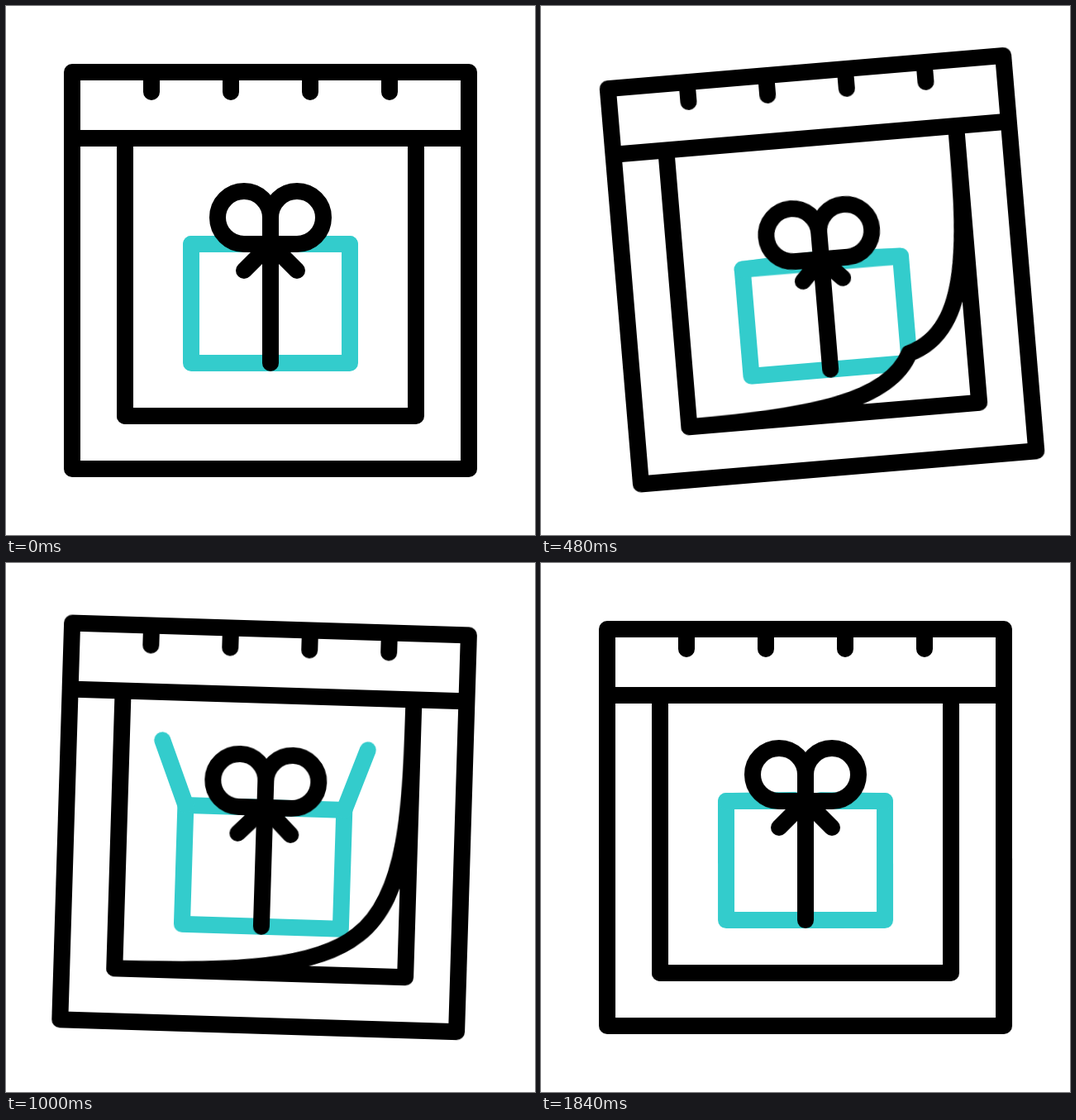
Animation of 640 by 640 pixels, one loop 2000 ms. Source, as an HTML page:

```html
<!DOCTYPE html>
<html lang="en">
<head>
<meta charset="utf-8">
<title>Gift calendar</title>
<style>
  html, body { margin: 0; width: 100%; height: 100%; overflow: hidden; background: #fff; }
  svg { display: block; width: 100vw; height: 100vh; }
  path { fill: none; stroke: #000; stroke-width: 20; stroke-linecap: round; stroke-linejoin: round; }
  .teal path { stroke: #3cc; }

  .swing, .box, .lid, .flap, .bow, .loop, .tails, .stem, .curl {
    animation: 2s cubic-bezier(.3333, 0, .6667, 1) infinite;
  }

  /* The whole calendar swings from its top edge */
  .swing { transform-origin: 320px 80px; animation-name: swing; }
  @keyframes swing {
    0%, 93.55%, 100% { transform: rotate(0deg); }
    22.15% { transform: rotate(-5deg); }
    42.15% { transform: rotate(3deg); }
    63.55% { transform: rotate(-1deg); }
  }

  /* The gift hops, lands squashed, then settles */
  .box { animation-name: box; }
  @keyframes box {
    0%, 93.55%, 100% { d: path("M224 288L416 288L416 432L224 432Z"); }
    11% { d: path("M224 264L416 264L416 412L224 412Z"); }
    22.15% { d: path("M224 312L416 312L416 441L224 441Z"); }
    42.15%, 63.55% { d: path("M224 296L416 296L416 440L224 440Z"); }
  }

  .lid { animation-name: lid; }
  @keyframes lid {
    0%, 93.55%, 100% { transform: translateY(0px); }
    11% { transform: translateY(-24px); }
    22.15% { transform: translateY(24px); }
    42.15%, 63.55% { transform: translateY(8px); }
  }

  .left { transform-origin: 224px 288px; animation-name: left; }
  @keyframes left {
    0%, 22.15%, 93.55%, 100% { transform: rotate(90deg); }
    42.15% { transform: rotate(-24deg); }
    63.55% { transform: rotate(-15.7deg); }
  }

  .right { transform-origin: 416px 288px; animation-name: right; }
  @keyframes right {
    0%, 22.15%, 93.55%, 100% { transform: rotate(-90deg); }
    42.15% { transform: rotate(22deg); }
    63.55% { transform: rotate(14.5deg); }
  }

  .bow { animation-name: bow; }
  @keyframes bow {
    0%, 93.55%, 100% { transform: translateY(0px); }
    11% { transform: translateY(-24px); }
    22.15% { transform: translateY(19.5px); }
    42.15%, 63.55% { transform: translateY(8px); }
  }

  .loop { animation-name: loop; }
  @keyframes loop {
    0%, 22.15%, 100% {
      d: path("M320 288L288 288C270.3 288 256 273.7 256 256C256 238.3 270.3 224 288 224C305.7 224 320 238.3 320 256Z");
    }
    11% {
      d: path("M320 288L288 278C270.3 272 256 264 256 245C256 229 270.3 219 288 219C305.7 219 320 232 320 249Z");
    }
  }

  .tails { animation-name: tails; }
  @keyframes tails {
    0%, 42.15%, 100% { d: path("M288 320L320 288L352 320"); }
    11% { d: path("M281 319L320 288L359 319"); }
    22.15% { d: path("M296 312.5L320 288L344 312.5"); }
  }

  .stem { animation-name: stem; }
  @keyframes stem {
    0%, 93.55%, 100% { d: path("M320 288L320 432"); }
    11% { d: path("M320 264L320 412"); }
    22.15% { d: path("M320 307.5L320 441"); }
    42.15%, 63.55% { d: path("M320 296L320 440"); }
  }

  /* The lower right corner of the page lifts; white hides the gift behind it */
  .curl { fill: #fff; animation-name: curl; }
  @keyframes curl {
    0%, 1%, 81.75%, 100% {
      d: path("M496 160C496 290 496 370 496 496C388 496 290 496 144 496L496 496Z");
    }
    28.75%, 31.25% {
      d: path("M496 160C496 290 496 411 410 424C388 485 290 496 144 496L496 496Z");
    }
  }
</style>
</head>
<body>
<svg viewBox="0 0 640 640">
  <g class="swing">
    <g class="teal">
      <path class="box"/>
      <g class="lid">
        <path class="flap left" d="M224 288V204.5"/>
        <path class="flap right" d="M416 288V210"/>
      </g>
    </g>
    <g class="bow">
      <path class="loop"/>
      <path class="loop" transform="matrix(-1 0 0 1 640 0)"/>
      <path class="tails"/>
    </g>
    <path class="stem"/>
    <path class="curl"/>
    <path d="M144 160V496"/>
    <path d="M80 80H560V560H80ZM80 160H560"/>
    <path d="M176 84V104M272 84V104M368 84V104M464 84V104"/>
  </g>
</svg>
</body>
</html>
```
